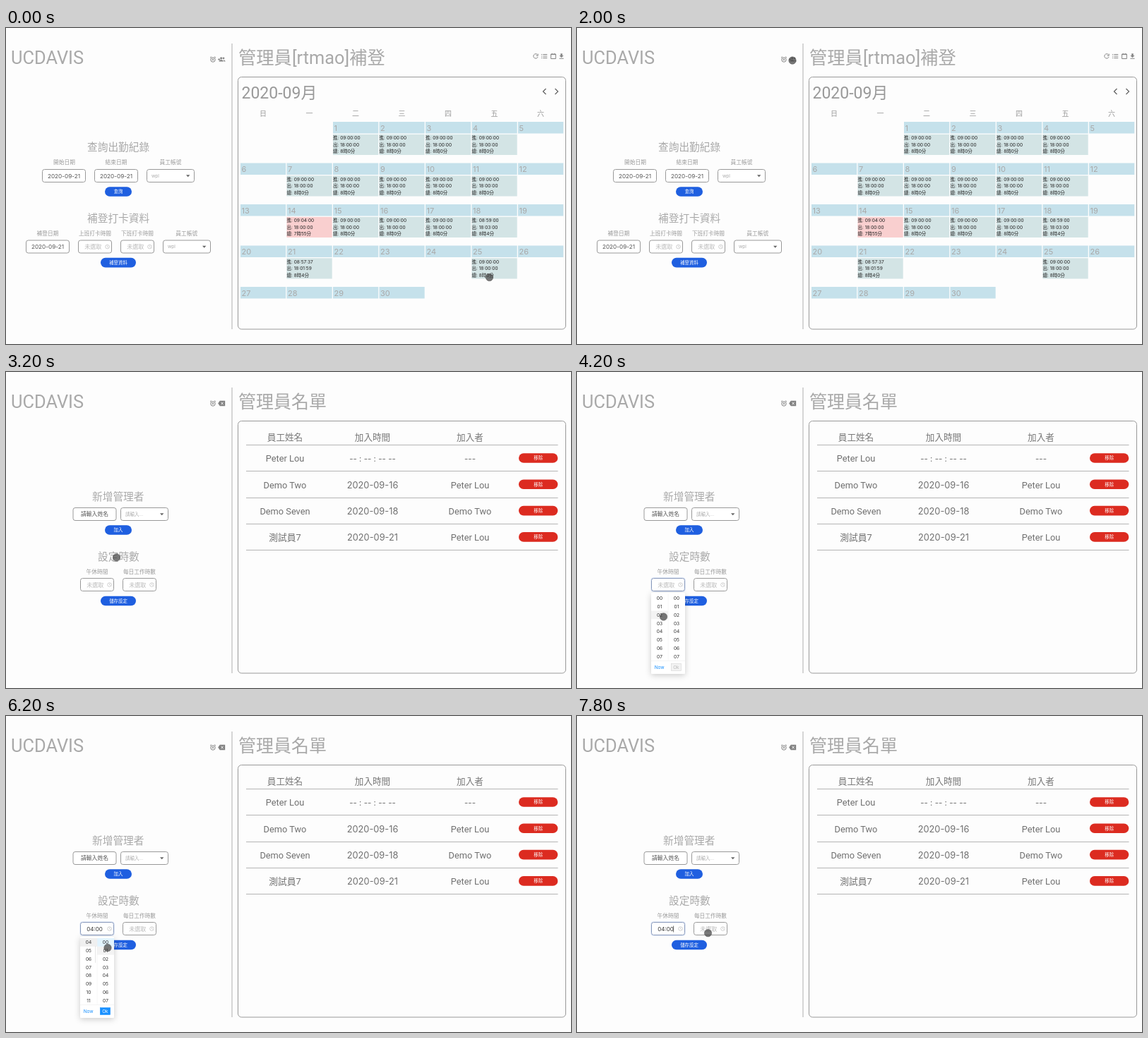
An HTML page for the animation above (8 s loop, 800 px wide and 448 px high).

```html
<!DOCTYPE html>
<html lang="zh-Hant">
<head>
<meta charset="utf-8">
<title>補登</title>
<style>
  html, body { margin: 0; width: 100%; height: 100%; overflow: hidden; background: #fdfdfd; }
  svg { display: block; width: 100%; height: 100%; }
  text { font-family: Inter, "Noto Sans CJK TC", "Noto Sans CJK", sans-serif; white-space: pre; }
  .narrow { font-family: Roboto, "Noto Sans CJK TC", "Noto Sans CJK", sans-serif; }
  .icon { fill: none; stroke: #858585; stroke-width: 1; }
  .solid { fill: #858585; }
</style>
</head>
<body>
<svg id="stage" viewBox="0 0 800 448"></svg>
<script>
const stage = document.getElementById('stage');
const BLUE = '#1f5fe0', RED = '#dc2b20', GRAY = '#a9a9a9', LABEL = '#999', EDGE = '#999';

function add(parent, tag, attrs) {
  const node = document.createElementNS('http://www.w3.org/2000/svg', tag);
  for (const key in attrs) node.setAttribute(key, attrs[key]);
  return parent.appendChild(node);
}
const group = parent => add(parent, 'g', {});
const rect = (g, x, y, width, height, fill, more) => add(g, 'rect', { x, y, width, height, fill, ...more });
const path = (g, d, more) => add(g, 'path', { d, class: 'icon', ...more });
const show = (node, on) => node.setAttribute('visibility', on ? 'inherit' : 'hidden');

// y is the vertical middle of the text
function label(g, str, x, y, size, fill, more) {
  const node = add(g, 'text', { x, y: y + size * 0.37, 'font-size': size, fill, ...more });
  node.textContent = str;
  return node;
}
const centred = (g, str, x, y, size, fill, more) =>
  label(g, str, x, y, size, fill, { 'text-anchor': 'middle', ...more });
const heading = (g, str, x, y, size) => label(g, str, x, y, size, GRAY, { class: 'narrow' });

function pill(g, str, x, y, w, fill) {
  rect(g, x, y, w, 13.6, fill, { rx: 6.8 });
  centred(g, str, x + w / 2, y + 6.8, 6.4, '#fff', { 'font-weight': 500 });
}
const box = (g, x, y, w) => rect(g, x, y, w, 18, '#fff', { rx: 3, stroke: EDGE });
function field(g, str, x, y, w, size = 8.2) {
  box(g, x, y, w);
  centred(g, str, x + w / 2, y + 9.1, size, '#555');
}
function select(g, str, x, y) {
  box(g, x, y, 67);
  label(g, str, x + 6.5, y + 8.8, 6.5, GRAY);
  path(g, `M${x + 55.5} ${y + 7.8}h5.4l-2.7 3z`, { class: '', fill: '#666' });
}
function timeField(g, x, y) {
  const frame = box(g, x, y, 47);
  const value = label(g, '未選取', x + 8.8, y + 9.1, 8, '#bbb');
  add(g, 'circle', { cx: x + 41, cy: y + 9.1, r: 2.8, fill: 'none', stroke: '#bbb', 'stroke-width': 0.7 });
  path(g, `M${x + 41} ${y + 7.4}v1.9l1.3 .7`, { style: 'stroke:#bbb;stroke-width:.6' });
  return { frame, value };
}

// Shared frame
rect(stage, 0, 0, 800, 448, '#fdfdfd');
heading(stage, 'UCDAVIS', 7, 42, 25.4);
rect(stage, 319.5, 22, 1, 405, '#b0b0b0');
rect(stage, 328.5, 69.5, 464, 357.5, '#fdfdfd', { rx: 5, stroke: EDGE });
add(stage, 'circle', { cx: 293, cy: 45, r: 3.2, class: 'icon' });
path(stage, 'M289 42.3l2-1.8M297 42.3l-2-1.8M293 43v2.2M291.6 45.2h2.8');

// Calendar page
const calendar = group(stage);
heading(calendar, '管理員[rtmao]補登', 329, 42, 25.3);
label(calendar, '2020-09月', 333.5, 91, 23, LABEL, { class: 'narrow' });
path(calendar, 'M764.5 86l-4 4l4 4M777.5 86l4 4l-4 4', { style: 'stroke:#666;stroke-width:1.3' });
path(calendar, 'M752.4 37.7a3.2 3.2 0 1 0 .7 3.2M753.2 36.6v2.6h-2.6');
path(calendar, 'M758 37.5h1.2M760.3 37.5h6M758 40h1.2M760.3 40h6M758 42.5h1.2M760.3 42.5h6');
path(calendar, 'M771.6 37h6.8v6.5h-6.8zM771.6 37.6h6.8M773.2 35.8v1M776.8 35.8v1');
path(calendar, 'M785.2 36.3h2.6v2.6h1.8l-3.1 3.1l-3.1-3.1h1.8zM783.4 42.8h6.2v1h-6.2z', { class: 'solid' });
add(calendar, 'circle', { cx: 304.7, cy: 42.8, r: 1.6, class: 'solid' });
add(calendar, 'circle', { cx: 308, cy: 42.8, r: 1.4, class: 'solid' });
path(calendar, 'M301.5 47.6c0-3.4 6.4-3.4 6.4 0zM308.6 47.6c0-1.2-.4-1.9-1-2.4c1.6-.2 3 .7 3 2.4z', { class: 'solid' });
path(calendar, 'M300.2 44.5h3M301.7 43v3');

[...'日一二三四五六'].forEach((day, i) => centred(calendar, day, 364 + 65.5 * i, 121, 10, LABEL));
const special = {
  14: ['09:04:00', '18:00:00', '7時55分'],
  18: ['08:59:00', '18:03:00', '8時4分'],
  21: ['08:57:37', '18:01:59', '8時4分']
};
for (let day = 1; day <= 30; day++) {
  const col = (day + 1) % 7, row = Math.floor((day + 1) / 7);
  const x = 332 + 65.5 * col, y = 133 + 58.5 * row;
  rect(calendar, x, y, 64.2, 16.5, '#c5e1eb');
  label(calendar, day, x + 1.5, y + 8.7, 11, GRAY);
  const worked = col > 0 && col < 6 && (day < 22 || day === 25);
  if (!worked) continue;
  rect(calendar, x, y + 17.8, 64.2, 29.2, day === 14 ? '#f9cfcf' : '#d3e4e5');
  const times = special[day] || ['09:00:00', '18:00:00', '8時0分'];
  times.forEach((time, i) =>
    label(calendar, '進出總'[i] + ': ' + time, x, y + 22.7 + 9.6 * i, 6.5, '#222'));
}

heading(calendar, '查詢出勤紀錄', 115, 169, 14.7);
centred(calendar, '開始日期', 82.5, 190.5, 7.7, LABEL);
centred(calendar, '結束日期', 156, 190.5, 7.7, LABEL);
centred(calendar, '員工帳號', 233, 190.5, 7.7, LABEL);
field(calendar, '2020-09-21', 51.5, 200.5, 61);
field(calendar, '2020-09-21', 125.5, 200.5, 61);
select(calendar, 'wpl', 199.5, 200.5);
pill(calendar, '查詢', 140, 225.2, 38, BLUE);
heading(calendar, '補登打卡資料', 115, 269.5, 14.7);
centred(calendar, '補登日期', 59, 291, 7.7, LABEL);
centred(calendar, '上班打卡時間', 126, 291, 7.7, LABEL);
centred(calendar, '下班打卡時間', 186, 291, 7.7, LABEL);
centred(calendar, '員工帳號', 255.7, 291, 7.7, LABEL);
field(calendar, '2020-09-21', 28.5, 301, 61);
timeField(calendar, 102.5, 301);
timeField(calendar, 162.5, 301);
select(calendar, 'wpl', 222.5, 301);
pill(calendar, '補登資料', 134, 325.8, 50, BLUE);

// Administrator page
const admin = group(stage);
heading(admin, '管理員名單', 329, 42, 25);
path(admin, 'M302.8 40.8h7.4v7.4h-7.4l-2.6-3.7z', { fill: '#808080', class: '' });
path(admin, 'M304.4 42.8l3.4 3.4M307.8 42.8l-3.4 3.4', { style: 'stroke:#fff' });
const columns = [395, 519, 657];
['員工姓名', '加入時間', '加入者'].forEach((str, i) => centred(admin, str, columns[i], 92, 12.6, '#777'));
const members = [
  ['Peter Lou', '-- : -- : -- --', '---'],
  ['Demo Two', '2020-09-16', 'Peter Lou'],
  ['Demo Seven', '2020-09-18', 'Demo Two'],
  ['測試員7', '2020-09-21', 'Peter Lou']
];
const rule = y => rect(admin, 340, y, 441.5, 1, '#b5b5b5');
rule(103);
members.forEach((cells, row) => {
  const y = 122.5 + 37.3 * row;
  cells.forEach((str, i) => {
    const dashes = str.startsWith('-');
    const style = i === 1 || dashes ? {} : { class: 'narrow' };
    centred(admin, str, columns[i], y, dashes ? 11.6 : 12.8, '#707070', style);
  });
  pill(admin, '移除', 726, y - 7.3, 55.3, RED);
  rule(Math.round(y + 17.7));
});
heading(admin, '新增管理者', 122, 177, 14.7);
field(admin, '請輸入姓名', 95, 192.5, 61, 7.8);
select(admin, '請輸入...', 162.5, 192.5);
pill(admin, '加入', 140, 217.2, 38, BLUE);
heading(admin, '設定時數', 130, 261.8, 14.7);
centred(admin, '午休時間', 129, 283, 7.7, LABEL);
centred(admin, '每日工作時數', 189, 283, 7.7, LABEL);
const glow = rect(admin, 104.3, 291.3, 49.4, 20.4, '#e3ebfa', { rx: 4 });
const lunch = timeField(admin, 105.5, 292.5);
timeField(admin, 165.5, 292.5);
pill(admin, '儲存設定', 134, 317.7, 50, BLUE);
const caret = rect(admin, 136.3, 297.5, 0.8, 9, '#444');

// Time picker
const picker = group(admin);
const ROW = 11.78, TOP = 315;
rect(picker, 105, 313, 48, 115, '#fff', { rx: 1, style: 'filter:drop-shadow(0 2px 4px #0003)' });
const hover = rect(picker, 105, TOP, 24, ROW, '#f3f3f3');
const hourMark = rect(picker, 105, TOP, 24, ROW, '#f0f0f0');
const minuteMark = rect(picker, 129, TOP, 24, ROW, '#e2f4ff');
rect(picker, 128.8, TOP, 0.5, 94, '#eee');
rect(picker, 105, 409.3, 48, 0.6, '#eee');
const hours = [];
for (let i = 0; i < 8; i++) {
  const y = TOP + ROW * (i + 0.5);
  hours.push(centred(picker, '', 117, y, 6.6, '#333'));
  centred(picker, '0' + i, 141, y, 6.6, '#333');
}
const scrollbar = rect(picker, 126.3, 326, 0.8, 24, '#ddd', { rx: 0.4 });
centred(picker, 'Now', 116.7, 418.4, 6.5, '#1890ff');
const okBox = rect(picker, 133.3, 413.6, 14.2, 9.8, '#f3f3f3', { 'stroke-width': 0.6 });
const okText = centred(picker, 'Ok', 140.4, 418.5, 6.3, '#bbb');

const cursor = add(stage, 'circle', { r: 5.2, fill: '#444', 'fill-opacity': 0.72, stroke: '#555', 'stroke-width': 0.5 });

// Cursor stops: time, x, y
const stops = [
  [0, 684.5, 353.5], [200, 684.5, 353.5], [1400, 305, 46], [2600, 305, 46], [3400, 129, 303],
  [3800, 128, 304], [4200, 122.5, 347], [5000, 117, 366.3], [5600, 117, 366.3],
  [6200, 144, 328.5], [6500, 142, 323], [7100, 140, 418], [7400, 140, 418], [7800, 185.5, 307.7], [8000, 185.5, 307.7]
];
function cursorAt(t) {
  const i = stops.findIndex((stop, n) => n && t <= stop[0]);
  const [t0, x0, y0] = stops[i - 1], [t1, x1, y1] = stops[i];
  const p = (t - t0) / (t1 - t0), e = p * p * (3 - 2 * p);
  return [x0 + (x1 - x0) * e, y0 + (y1 - y0) * e];
}

function draw(t) {
  const [x, y] = cursorAt(t);
  cursor.setAttribute('cx', x);
  cursor.setAttribute('cy', y);
  const onAdmin = t >= 2200, focused = t >= 3800, open = focused && t < 7600, chosen = t >= 5600;
  show(calendar, !onAdmin);
  show(admin, onAdmin);
  if (!onAdmin) return;

  show(picker, open);
  show(glow, focused);
  show(caret, t >= 7600);
  lunch.frame.setAttribute('stroke', focused ? '#8798ba' : EDGE);
  lunch.value.textContent = chosen ? '04:00' : '未選取';
  lunch.value.setAttribute('fill', chosen ? '#333' : '#bbb');
  for (const node of [hourMark, minuteMark, scrollbar]) show(node, open && chosen);
  const row = Math.floor((y - TOP) / ROW);
  show(hover, open && row >= 0 && row < 8 && x < 153);
  if (!open) return;

  hours.forEach((node, i) => node.textContent = String(i + (chosen ? 4 : 0)).padStart(2, '0'));
  hover.setAttribute('x', x < 129 ? 105 : 129);
  hover.setAttribute('y', TOP + ROW * row);
  okBox.setAttribute('fill', chosen ? '#1890ff' : '#f3f3f3');
  okBox.setAttribute('stroke', chosen ? '#1890ff' : '#d5d5d5');
  okText.setAttribute('fill', chosen ? '#fff' : '#bbb');
}

const start = performance.now();
function tick() {
  const t = (performance.now() - start) % 8000;
  draw(Math.floor(t / 200) * 200);
  requestAnimationFrame(tick);
}
tick();
</script>
</body>
</html>
```
